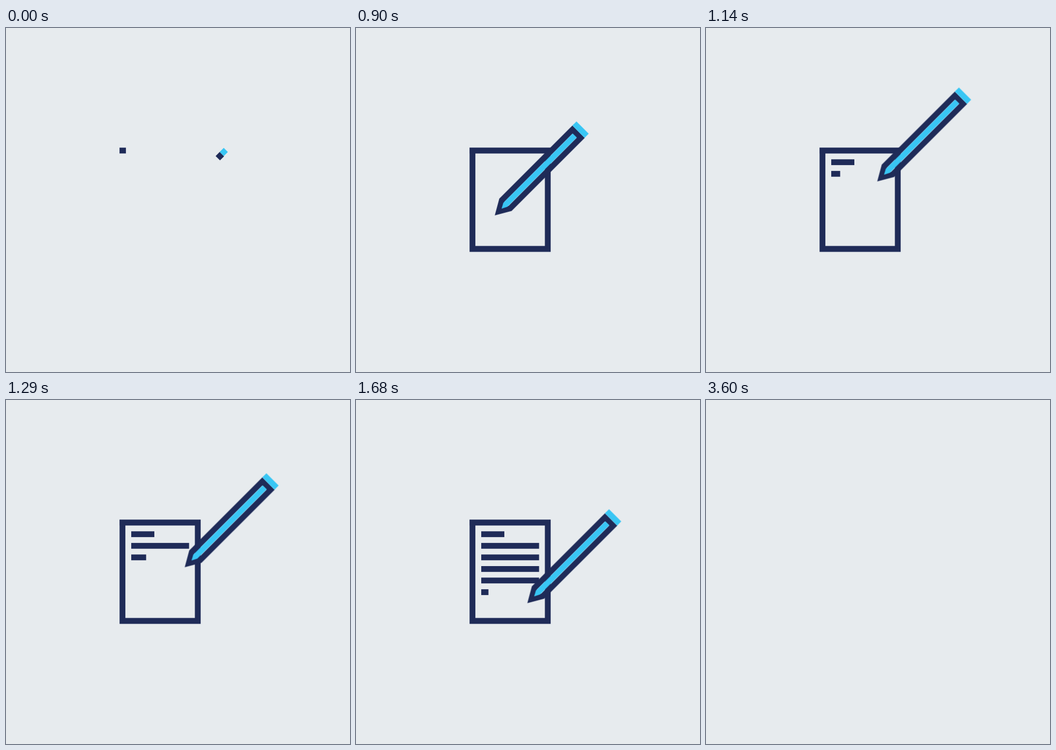
An HTML page that plays this animation: 640x640 px, repeating every 3630 ms.

```html
<!DOCTYPE html>
<html lang="en">
<head>
<meta charset="utf-8">
<title>Writing pencil</title>
<style>
@property --t { syntax: "<number>"; inherits: true; initial-value: 0; }

html, body { margin: 0; width: 100%; height: 100%; overflow: hidden; background: #e7ebee; }
svg { display: block; width: 100vw; height: 100vh; --t: 0; animation: clock 3630ms linear infinite; }

.ink, .eraser { fill: none; stroke-width: 10.8; }
.ink { stroke: #1f2b58; }
.eraser { stroke: #39c6f4; }
.lines, .wedge { fill: #1f2b58; }
.core { fill: #39c6f4; }

.paper, .body, .eraser, .wedge, .core, .rise, .sweep, .scene { animation: 3630ms linear infinite; }
.scene { animation-name: scene; }
.paper { stroke-dasharray: 658; animation-name: paper; }
.body { stroke-dasharray: 441.3; animation-name: body; }
.eraser { stroke-dasharray: 32.2; animation-name: eraser; }
.wedge { animation-name: wedge; }
.core { animation-name: core; }
.rise { animation-name: rise; }
.sweep { animation-name: sweep; animation-timing-function: cubic-bezier(.364, 0, .636, 1); }

/* each line grows from its own start time --d */
.lines rect {
  transform-origin: 233px 0;
  transform: scaleX(clamp(0, (var(--t) - var(--d)) / 136, 1));
}

@keyframes clock { from { --t: 0; } to { --t: 3630; } }
@keyframes scene { 0%, 99.16% { opacity: 1; } 99.17%, 100% { opacity: 0; } }
@keyframes paper { 0% { stroke-dashoffset: 647; } 19.1%, 100% { stroke-dashoffset: 0; } }
@keyframes body {
  0% { stroke-dashoffset: 430.3; }
  14.05% { stroke-dashoffset: 165.3; }
  20.66%, 100% { stroke-dashoffset: 0; }
}
@keyframes eraser { 0% { stroke-dashoffset: 21.4; } 13.77%, 100% { stroke-dashoffset: 0; } }
@keyframes wedge { 0%, 11.8% { opacity: 0; } 11.81%, 100% { opacity: 1; } }
@keyframes core { 0%, 15.2% { opacity: 0; } 20.66%, 100% { opacity: 1; } }
@keyframes rise {
  0%, 23.97% { transform: translateY(0); }
  26.45% { transform: translateY(-143.3px); }
  49.5%, 100% { transform: translateY(0); }
}
@keyframes sweep {
  0%, 23.97% { transform: translateX(0); }
  28.24% { transform: translateX(53px); }
  30.08%, 33.8%, 37.52%, 41.24%, 44.96%, 48.68% { transform: translateX(0); }
  31.96%, 35.67%, 39.39%, 43.11%, 46.83% { transform: translateX(80px); }
  50.96% { transform: translateX(47px); }
  53.72%, 100% { transform: translateX(0); }
}
</style>
</head>
<body>
<svg viewBox="0 0 640 640">
  <clipPath id="stage"><rect y="93.5" width="640" height="453"/></clipPath>
  <g class="scene" clip-path="url(#stage)">
    <path class="ink paper" d="M211.2 228H356.8V411H216.7V222.6"/>
    <g class="lines">
      <rect x="233" y="244.3" width="43" height="10.8" style="--d:950"/>
      <rect x="233" y="265.9" width="107.6" height="10.8" style="--d:1120"/>
      <rect x="233" y="287.4" width="107.6" height="10.8" style="--d:1256"/>
      <rect x="233" y="309" width="107.6" height="10.8" style="--d:1392"/>
      <rect x="233" y="330.4" width="107.6" height="10.8" style="--d:1528"/>
      <rect x="233" y="352.1" width="107.6" height="10.8" style="--d:1664"/>
      <rect x="233" y="373.8" width="43" height="10.8" style="--d:1800"/>
    </g>
    <g class="rise">
      <g class="sweep">
        <path class="ink body" d="M393.8 234.4L412.9 253.5 281.7 384.7 260.8 390.2 266.4 369.4 397.7 238.1"/>
        <path class="wedge" d="M261 390L268.5 375.1 276.3 382.9Z"/>
        <path class="core" d="M398.2 245.4L405.7 252.8 276.5 381.8 265.8 385.2 269 374.4Z"/>
        <path class="eraser" d="M401.3 226.8L424.1 249.6"/>
      </g>
    </g>
  </g>
</svg>
</body>
</html>
```
